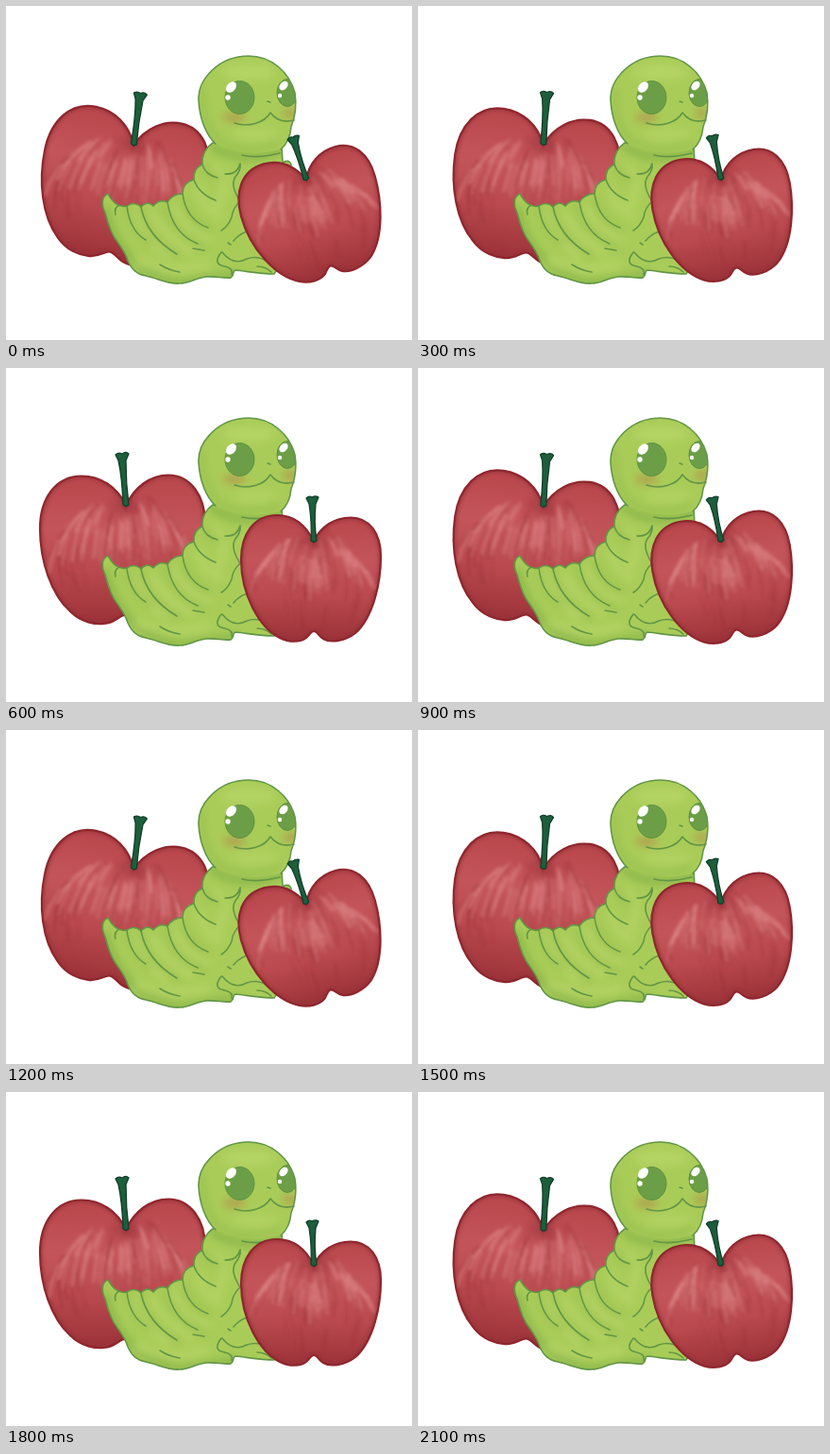
Animation of 430x354 px, one loop 2400 ms. Source, as an HTML page:

```html
<!DOCTYPE html>
<html lang="en">
<head>
<meta charset="utf-8">
<title>Worm and apples</title>
<style>
html, body { margin: 0; width: 100%; height: 100%; overflow: hidden; background: #fff; }
svg { display: block; width: 430px; height: 354px; }
.line { fill: none; stroke: #629646; stroke-width: 1.6; stroke-linecap: round; stroke-linejoin: round; }
</style>
</head>
<body>
<svg viewBox="0 0 430 354" xmlns="http://www.w3.org/2000/svg">
  <defs>
    <linearGradient id="skin" x2="0" y2="1">
      <stop offset="0" stop-color="#b8464b"/>
      <stop offset=".36" stop-color="#c3555a"/>
      <stop offset=".65" stop-color="#b9494e"/>
      <stop offset="1" stop-color="#9b3238"/>
    </linearGradient>
    <filter id="soft" x="-20%" y="-20%" width="140%" height="140%"><feGaussianBlur stdDeviation="1.5"/></filter>
    <filter id="blur" x="-50%" y="-50%" width="200%" height="200%"><feGaussianBlur stdDeviation="4"/></filter>
    <clipPath id="bodyClip"><use href="#body"/></clipPath>
    <clipPath id="headClip"><use href="#head"/></clipPath>
  </defs>
  <g id="backApple"></g>
  <g id="worm">
    <path id="body" fill="#a9cc58" d="M219 145 C213 149 207 157 208 168 C202 170 198 177 199 184 C191 186 187 192 187 199 C180 199 174 203 171 208 C165 205 160 207 156 212 C151 207 146 209 143 213 C138 208 132 209 128 212 C119 214 112 207 108 199 C101 202 101 211 105 219 C108 231 112 243 118 250 C123 257 127 263 129 270 C133 279 138 284 148 286 C162 289 171 295 184 294 C194 294 201 288 212 287 C222 286 230 289 238 288 C243 285 239 281 243 280 C255 281 268 284 284 284 C291 275 302 246 300 210 L302 168 C300 163 296 164 293 166 L292 148 Z"/>
    <g clip-path="url(#bodyClip)">
      <g filter="url(#blur)" fill="none" stroke-linecap="round">
        <path stroke="#8db84b" stroke-width="9" d="M219 149 Q254 170 294 151 M105 216 Q122 284 185 294 L244 285"/>
        <path stroke="#b3d364" stroke-width="8" d="M222 172 Q237 184 225 211 M205 196 Q208 213 226 222 M178 214 Q188 239 214 247 M154 221 Q169 246 195 260 M135 220 Q144 244 170 264 M264 181 L258 240 M140 270 Q167 285 212 274"/>
        <path stroke="#96bd4c" stroke-width="4" d="M209 170 Q215 181 227 184 M188 204 Q193 226 215 237 M168 210 Q179 243 212 255 M144 216 Q153 249 184 264 M128 214 Q135 241 153 252"/>
      </g>
    </g>
    <use href="#body" class="line" style="fill-opacity:0"/>
    <path class="line" d="M208 168 Q211 179 224 182 M199 184 Q204 199 222 206 M187 199 Q191 227 214 235 M171 208 Q176 241 203 252 M143 213 Q149 244 181 263 M128 212 Q131 238 148 248 M120 211 Q114 214 116 221 M163 274 Q172 280 184 282 M198 257 L210 259"/>
    <path class="line" d="M248 167 Q245 179 232 178 M248 167 Q249 174 243 181 Q237 190 248 207 Q240 214 239 224 Q235 234 228 238 M235 251 L238 253 M228 261 Q218 274 232 276 Q241 278 239 285 M229 261 Q241 276 255 268 Q267 264 277 271 M241 249 Q248 240 259 238 M266 276 Q275 276 281 282 M250 158 Q266 162 290 156"/>
    <path id="head" fill="#a9cc58" d="M204 100 C203 78 225 53 257 53 C281 53 300 70 306 92 C308 105 306 118 302 128 C301 140 297 147 291 152 Q256 161 222 146 C211 136 205 118 204 100 Z"/>
    <g clip-path="url(#headClip)">
      <g filter="url(#blur)">
        <ellipse cx="257" cy="70" rx="29" ry="9" fill="#b4d363"/>
        <ellipse cx="264" cy="136" rx="24" ry="7" fill="#b1d160"/>
        <path d="M208 87 Q207 132 229 145 Q255 159 290 145" fill="none" stroke="#98c04f" stroke-width="6"/>
        <ellipse cx="242" cy="118" rx="12" ry="5" fill="#b3954a" opacity=".8"/>
        <ellipse cx="301" cy="114" rx="8" ry="5" fill="#b3954a" opacity=".8"/>
      </g>
      <g fill="#6c9e48" stroke="#5e913f">
        <ellipse cx="247.500" cy="97" rx="15.500" ry="17.500"/>
        <ellipse cx="298" cy="92" rx="11" ry="14.500"/>
      </g>
      <g fill="#fff">
        <ellipse cx="238.500" cy="86" rx="6.500" ry="4.600" transform="rotate(-50 238.500 86)"/>
        <circle cx="235" cy="97" r="2.700"/>
        <ellipse cx="294" cy="84.500" rx="5.500" ry="3.800" transform="rotate(-48 294 84.500)"/>
        <circle cx="290" cy="95" r="2.200"/>
      </g>
    </g>
    <path class="line" d="M222 146 C211 136 205 118 204 100 C203 78 225 53 257 53 C281 53 300 70 306 92 C308 105 306 118 302 128 C301 140 297 147 291 152"/>
    <path class="line" d="M242 124 C256 129 274 124 280 113 C286 121 294 124 305 121 M277 101 L280 102"/>
  </g>
  <g id="frontApple"></g>
</svg>
<script>
const LOOP = 2400, HOLD = 300;

function seeded(seed) {
  return () => (seed = (seed * 16807) % 2147483647) / 2147483647;
}

// Soft brush strokes fan out from the stem: light above, dark below.
function streaks({ cx, top, width, height, seed }) {
  const rand = seeded(seed);
  const point = (u, v) => {
    const x = cx + u * width * (0.1 + 0.88 * Math.sin(Math.PI * (0.06 + 0.72 * v)));
    const y = top + v * height - 0.16 * height * Math.sin(Math.PI * Math.abs(u));
    return `${x.toFixed(1)} ${y.toFixed(1)}`;
  };
  let out = '';
  for (let i = 0; i < 110; i++) {
    const light = i % 3 > 0;
    const u = rand() * 1.8 - 0.9;
    const v = light ? 0.14 + 0.26 * rand() : 0.05 + 0.7 * rand();
    const len = 0.1 + 0.16 * rand();
    out += `<path d="M${point(u, v)} Q${point(u, v + len / 2)} ${point(u, v + len)}" stroke="${light ? '#df8a8b' : '#9d3138'}"
      stroke-width="${(2 + 3 * rand()).toFixed(1)}" opacity="${(0.14 + 0.22 * rand()).toFixed(2)}"/>`;
  }
  return out;
}

function drawApple(apple) {
  const { id, skin, stem, dip } = apple;
  const node = document.getElementById(id);
  node.innerHTML = `
    <clipPath id="${id}Clip"><path d="${skin}"/></clipPath>
    <path d="${skin}" fill="url(#skin)"/>
    <g clip-path="url(#${id}Clip)" fill="none" stroke-linecap="round">
      <path d="${skin}" stroke="#93313a" stroke-width="6" opacity=".55" filter="url(#soft)"/>
      <ellipse cx="${dip[0]}" cy="${dip[1]}" rx="17" ry="9" fill="#97303a" opacity=".4" filter="url(#blur)"/>
      <g filter="url(#soft)">${streaks(apple)}</g>
    </g>
    <path d="${skin}" fill="none" stroke="#8f262d" stroke-width="2.2"/>
    <path d="${stem}" fill="#1d5e3b" stroke="#123f2a" stroke-width="1.3" stroke-linejoin="round"/>`;
  return node;
}

const apples = [
  {
    id: 'backApple', pivot: '125 186', angles: [0, 8.2, 11.8],
    cx: 124, top: 142, width: 92, height: 132, seed: 71, dip: [127, 146],
    skin: 'M127 146 C118 126 100 114.500 80 114.500 C52 114.500 36 139 36 170 C36 205 48 240 68 258 C80 270 95 272 104 271 C116 270 120 262 126 262 C132 262 137 271 148 271 C180 271 211 215 211 165 C211 135 195 113.500 172 113.500 C153 113.500 136 126 127 146 Z',
    stem: 'M116 92 Q119 89 123 91 Q127 88 130 91 L127 98 Q127 122 130 145 Q127 148 124 145 Q123 116 119 98 Z'
  },
  {
    id: 'frontApple', pivot: '322 213', angles: [0, -9.7, -15.5],
    cx: 324, top: 180, width: 77, height: 114, seed: 1234, dip: [326, 184],
    skin: 'M326 184 C318 167 305 156 287 156 C262 156 249 177 249 203 C249 240 268 275 290 286 C300 291 312 291 318 286 C322 282 323 279 326 279 C330 279 331 284 336 287 C344 292 360 289 370 281 C390 263 397 225 397 200 C397 175 385 158.500 365 158.500 C348 158.500 333 168 326 184 Z',
    stem: 'M318 138 Q321 135 324 137 Q328 135 331 137 L328 144 Q326 164 329 183 Q326 186 323 183 Q324 162 321 144 Z'
  }
];
for (const apple of apples) apple.node = drawApple(apple);

function render(time) {
  const pose = [2, 1, 0, 1][Math.floor((time % LOOP) / HOLD) % 4];
  for (const { node, angles, pivot } of apples) {
    node.setAttribute('transform', `rotate(${angles[pose]} ${pivot})`);
  }
}

const start = performance.now();
function tick() {
  render(performance.now() - start);
  requestAnimationFrame(tick);
}
tick();
</script>
</body>
</html>
```
